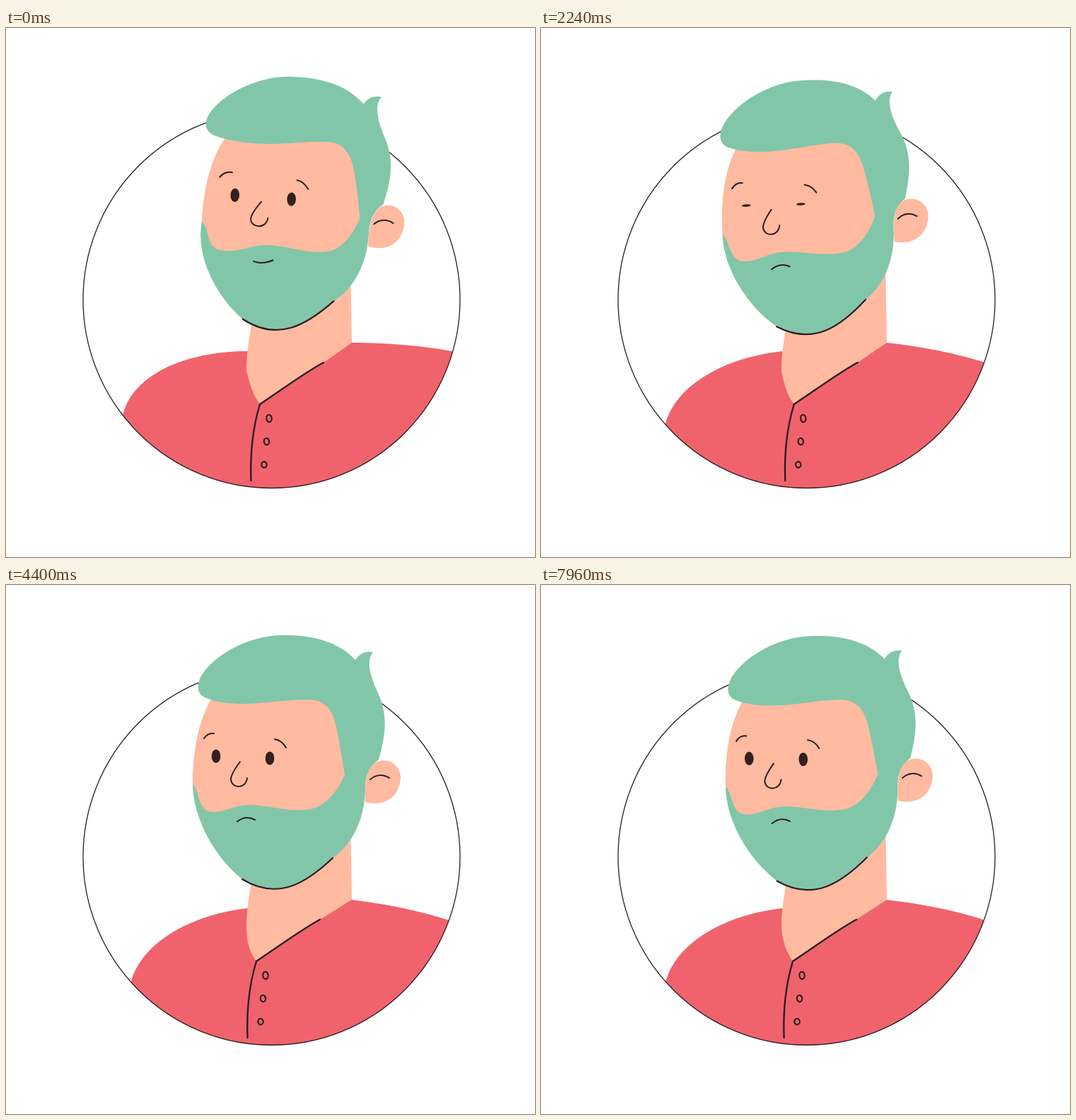
An HTML page with a canvas that plays this animation: 748 by 748 pixels, repeating every 8000 ms.

```html
<!DOCTYPE html>
<html lang="en">
<head>
<meta charset="utf-8">
<title>Bearded man turning his head</title>
<style>
html, body { margin: 0; width: 100%; height: 100%; overflow: hidden; background: #fff; }
canvas { display: block; width: 100vw; height: 100vh; }
</style>
</head>
<body>
<canvas id="stage" width="748" height="748"></canvas>
<script>
const ctx = document.getElementById('stage').getContext('2d');
const LOOP = 8000, STEP = 40;
const GREEN = '#82c6a9', SKIN = '#ffbaa0', RED = '#f0636d', INK = '#2b1f22', EYE = '#33201f';

// Paths: a start point, then cubic Bezier segments of three points each.
const path = text => text.trim().split(/\s+/).map(p => p.split(',').map(Number));
const JAW = '462,386 425,421 385,447 334,416';
const jaw = path(JAW);
const hair = path(`494,106
  500,97 508,93 519,95  508,108 516,132 527,155  541,187 536,215 527,247
  512,258 508,272 508,290  506,350 475,377 ${JAW}  296,386 264,330 264,281
  274,290 270,321 293,321  312,321 322,311 344,311  372,311 400,322 430,317
  452,313 470,290 479,268  474,240 469,205 464,190  458,170 445,162 425,162
  395,162 365,168 335,168  317,168 297,166 284,160  268,155 269,138 279,124
  297,98 345,70 394,71  430,71 468,78 494,106`);
const face = path('291,160 274,188 264,230 264,281 268,390 470,390 485,268 505,170 490,130 291,160');
const ear = path('508,307 507,285 508,248 534,248 549,248 558,260 558,273 556,300 535,314 508,307');
const earFold = path('515,275 523,268 533,267 542,273');
const nose = path('331,250 322,262 318,270 318,275 319,288 339,289 341,273');
const brows = [path('280,217 284,211 289,209 294,210'), path('380,218 387,219 393,225 396,230')];
const eyes = path('297,242 373,245');
const neck = path('350,400 345,435 340,455 340,485 340,505 345,520 354,532');
const collar = path('354,532 390,508 418,487 444,473');
const placket = path('354,532 344,565 340,600 341.5,640');
const shoulders = [path('177,560 195,500 270,465 342,457'), path('488,445 540,451 590,462 626,474')];

// tilt: radians, turn: sideways shift of the face, bend: mouth curve, slide: collar offset
const FRONT = { tilt: .036, turn: 24, drop: -3, bend: 3, shrug: 1, slide: 5 };
const SAD = { tilt: -.165, turn: 16, drop: 9, bend: -4, shrug: .2, slide: 5 };
const ASIDE = { tilt: 0, turn: 0, drop: 0, bend: -4, shrug: 0, slide: 0 };

const clamp = v => Math.min(1, Math.max(0, v));
const progress = (t, from, to) => clamp((t - from) / (to - from));
const smooth = u => u * u * (3 - 2 * u);
const lerp = (a, b, u) => a + (b - a) * u;
const blend = (a, b, u) => Object.fromEntries(Object.keys(a).map(k => [k, lerp(a[k], b[k], u)]));

// Cubic Bezier easing with y controls 0 and 1.
function ease(u, x1, x2) {
  let lo = 0, hi = 1;
  for (let i = 0; i < 24; i++) {
    const s = (lo + hi) / 2, r = 1 - s;
    if (3 * r * r * s * x1 + 3 * r * s * s * x2 + s * s * s < u) lo = s; else hi = s;
  }
  return smooth(lo);
}

function poseAt(t) {
  if (t < 1800) return blend(FRONT, SAD, ease(progress(t, 0, 1310), .33, .2));
  const u = progress(t, 1800, 3160), back = progress(t, 7160, 7960) ** 2;
  const pose = blend(SAD, ASIDE, ease(u, .3, .1) - .155 * back);
  pose.slide = lerp(SAD.slide, ASIDE.slide, smooth(u) - .42 * back);
  return pose;
}

const openness = t => Math.min(...[2240, 4320, 6120].map(c =>
  Math.min(1, Math.max(.18, Math.abs(t - c) / 80))));

// The head tilts about the chin; the middle of the face shifts more than its rim.
function headWarp({ tilt, turn, drop }) {
  const cos = Math.cos(tilt), sin = Math.sin(tilt);
  return ([x, y]) => {
    const r2 = ((x - 380) / 130) ** 2 + ((y - 250) / 165) ** 2;
    const depth = Math.max(0, 1 - r2 * r2);
    const dx = x - 375, dy = y - 429;
    return [375 + dx * cos - dy * sin + turn * depth, 429 + dx * sin + dy * cos + drop];
  };
}

// Shoulders rise more the farther they are from the neck.
const shrugWarp = ({ shrug }) => ([x, y]) => {
  const lift = shrug * clamp((Math.abs(x - 415) - 73) / 140);
  return [x + Math.sign(x - 415) * 11 * lift, y - 16 * lift];
};

function trace(points, warp) {
  const [start, ...rest] = points.map(warp);
  ctx.lineTo(...start);
  for (let i = 0; i < rest.length; i += 3) {
    ctx.bezierCurveTo(...rest[i], ...rest[i + 1], ...rest[i + 2]);
  }
}

function fill(color, build) {
  ctx.beginPath();
  build();
  ctx.closePath();
  ctx.fillStyle = color;
  ctx.fill();
}

function stroke(width, build) {
  ctx.beginPath();
  build();
  ctx.lineWidth = width;
  ctx.strokeStyle = INK;
  ctx.stroke();
}

const disc = () => ctx.arc(375.5, 384, 266.5, 0, 7);

function drawBody(pose) {
  const lift = shrugWarp(pose);
  const slide = ([x, y]) => [x + pose.slide, y];
  ctx.save();
  ctx.beginPath();
  disc();
  ctx.clip();
  fill(RED, () => {
    ctx.moveTo(100, 760);
    shoulders.forEach(s => trace(s, lift));
    ctx.lineTo(760, 520);
    ctx.lineTo(760, 760);
  });
  ctx.restore();
  stroke(1.3, disc);

  fill(SKIN, () => {
    trace(neck, p => p[1] > 500 ? slide(p) : p);
    trace(collar, slide);
    ctx.lineTo(489, 445);
    ctx.lineTo(487, 330);
  });
  stroke(2.4, () => trace(collar, slide));
  stroke(2.4, () => trace(placket, slide));
  for (let i = 0; i < 3; i++) {
    const [x, y] = slide([367 - 3.5 * i, 552 + 32.7 * i]);
    stroke(2.2, () => ctx.ellipse(x, y, 3.7, 5.2 - .5 * i, -.1, 0, 7));
  }
}

function drawHead(pose, open) {
  const warp = headWarp(pose);
  fill(SKIN, () => trace(face, warp));
  fill(GREEN, () => trace(hair, warp));
  stroke(2.2, () => trace(jaw, warp));
  fill(SKIN, () => trace(ear, warp));
  [earFold, nose, ...brows].forEach(line => stroke(2, () => trace(line, warp)));
  stroke(2, () => {
    ctx.moveTo(...warp([327, 334.5]));
    ctx.quadraticCurveTo(...warp([339, 333 + 2 * pose.bend]), ...warp([352, 332]));
  });
  eyes.map(warp).forEach(([x, y]) =>
    fill(EYE, () => ctx.ellipse(x, y, 6.3, 9.6 * open, pose.tilt, 0, 7)));
}

function draw(t) {
  const pose = poseAt(t);
  ctx.fillStyle = '#fff';
  ctx.fillRect(0, 0, 748, 748);
  ctx.lineCap = ctx.lineJoin = 'round';
  drawBody(pose);
  drawHead(pose, openness(t));
}

function frame() {
  const t = performance.now() % LOOP;
  draw(Math.floor(t / STEP) * STEP);
  requestAnimationFrame(frame);
}
frame();
</script>
</body>
</html>
```
